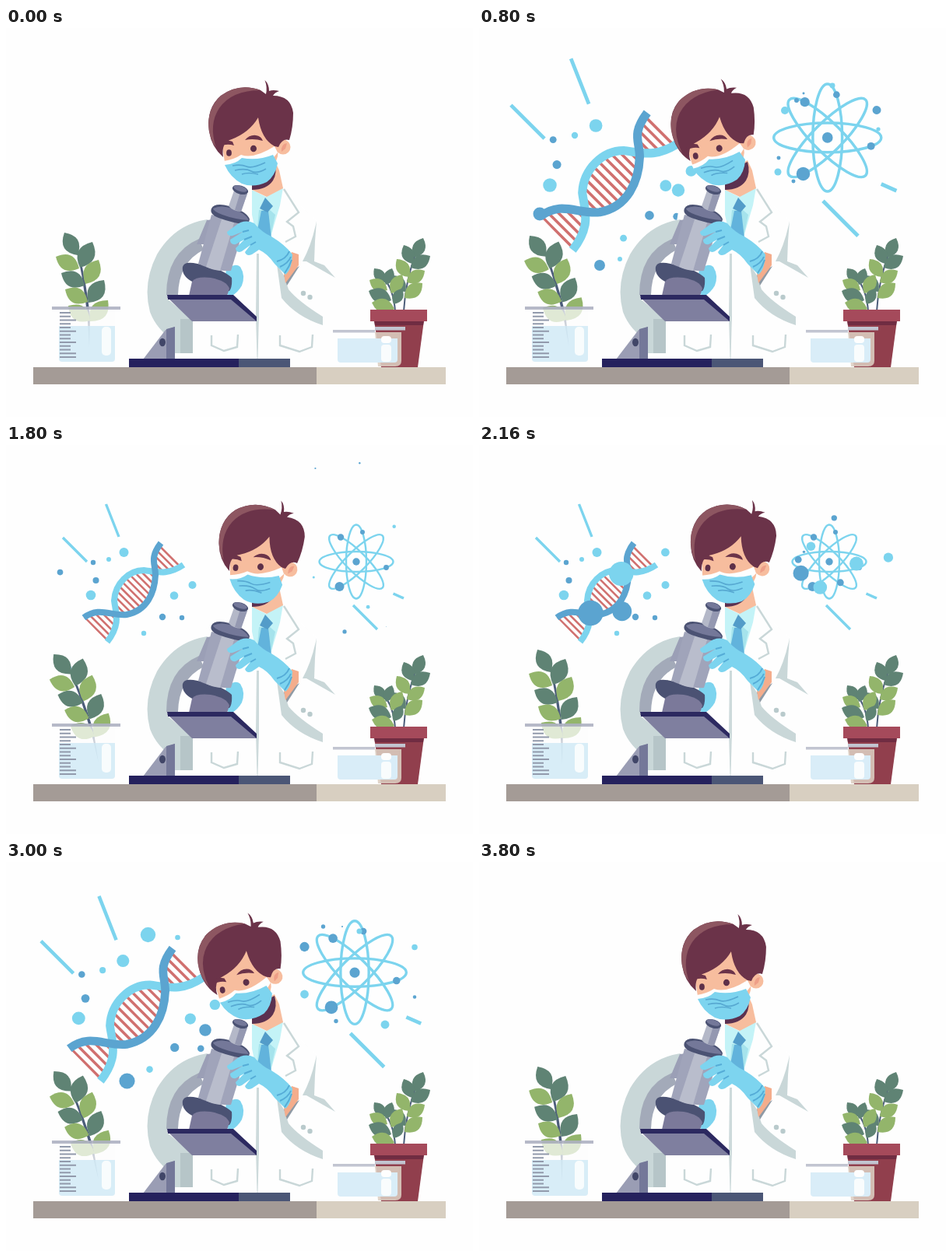
An HTML page for the animation above (3840 ms loop, 600 by 500 pixels).

```html
<!DOCTYPE html>
<html lang="en">
<head>
<meta charset="utf-8">
<title>Scientist at the microscope</title>
<style>
  html, body { margin: 0; width: 100%; height: 100%; overflow: hidden; background: #fefefe; }
  svg { display: block; width: 600px; height: 500px; }
  .line { fill: none; stroke: #c9d7d8; stroke-width: 2.4; }
  .ray { stroke: #7cd4ee; stroke-width: 3.4; }
</style>
</head>
<body>
<svg viewBox="0 0 600 500">
  <defs><clipPath id="between"><path id="strandArea"/></clipPath></defs>

  <g id="dna">
    <path class="ray" d="M73 119L104 150M128.5 76L145 118"/>
    <g id="rungs" clip-path="url(#between)" stroke="#d0706f" stroke-width="2.6"></g>
    <path id="lightStrand" fill="none" stroke="#7cd4ee" stroke-width="8"/>
    <path id="darkStrand" fill="none" stroke="#5ba4d0" stroke-width="8"/>
  </g>
  <g id="atom">
    <path class="ray" d="M446 206L477 237M497.500 191L511 197"/>
    <g id="orbits" fill="none" stroke="#7cd4ee" stroke-width="2.4"></g>
  </g>
  <g id="sparks"></g>

  <!-- coat -->
  <path fill="#fefefe" d="M316 208L256 236L250 275L240 345V425H395L407 382L423 321L399 248L353 205Z"/>
  <path fill="#c4f3f7" d="M316 208L334 217L356 205L352 228L340 268H322L316 240Z"/>
  <path fill="#a5e3ec" d="M325 234L322 268H340L346 240L338 233Z"/>
  <path fill="#62b3dc" d="M328 235L337 235L341 270H321Z"/>
  <path fill="#539cc9" d="M333 218L343 229L336 237L326 232Z"/>
  <path class="line" d="M357 207L376 237L361 249L369 255L372 268L359 275"/>
  <path fill="#cddadb" d="M322 290H325L325 370L323.500 425H322.500L321 370Z"/>
  <path fill="#c9d7d8" d="M399 248L397 274L396 300L409 305L423 321L386 300L381 300Q393 278 399 248Z"/>
  <path class="line" stroke-width="2" d="M264 395V408L280 415L297 410L298 394M352 395V408L377 416L393 410L394 394"/>

  <!-- neck -->
  <path fill="#f7bd9e" d="M316 185L345 170L351 183L356 206L335 217L316 208Z"/>
  <path fill="#5b3150" d="M316 186L345 172Q349 186 343 196Q335 208 316 208Z"/>

  <g id="head">
    <path fill="#f7bd9e" d="M276 140L318 112L352 125L349 165L340 192L300 196L281 172Z"/>
    <circle cx="356" cy="153" r="9.500" fill="#f7bd9e"/>
    <path d="M361 148Q353 149 354 159L359 155Z" fill="#ee9f88"/>
    <path fill="#6b3349" d="M279 166Q264 153 261 133Q257 103 276 87Q300 70 327 80L334 85Q336 76 332.500 67Q338 72 338 81Q343 79 351 81Q345 83 343 87Q366 87 369 109Q369 128 364 144Q355 141 350 153L345 152Q328 143 324 115Q313 134 290 143Q276 147 279 166Z"/>
    <path fill="#8d5661" d="M270 154Q260 140 260 122Q261 101 276 87Q299 70 327 80Q290 80 274 103Q260 124 270 154Z"/>
    <path fill="#6b3349" d="M274 152Q277 144 284 144L291 146L293 151Q284 148 274 152ZM307 144Q313 137 321 138Q328 139 330 145Q318 141.500 307 144Z"/>
    <ellipse cx="286.500" cy="160.500" rx="3.400" ry="4.300" fill="#5d3049"/>
    <ellipse cx="318" cy="155" rx="4" ry="4.300" fill="#5d3049"/>
    <path fill="#fefefe" d="M280 171Q293 169 302 163Q318 169 345 152L349 160L341 170L282 178Z"/>
    <path fill="#7dd4ef" d="M281 176Q295 175 303 167Q323 171 343 163L349 174Q346 190 335 198Q318 206 303 200Q288 192 281 176Z"/>
    <path fill="none" stroke="#57a9d2" stroke-width="1.700" d="M291 177Q302 175 309 178T333 173M294 183Q308 180 315 184T334 181M303 188Q311 185 324 188"/>
  </g>

  <!-- hand behind the tube -->
  <path fill="#7dd4ef" d="M283 311Q294 301 301 307Q308 318 303 331Q298 340 289 345L278 338Z"/>

  <!-- microscope -->
  <path fill="#c9d7d8" d="M259 246Q217 252 194 291Q175 328 185 365Q194 389 217 402V418H240V375L207 348Q206 303 251 277Z"/>
  <path fill="#a3aab9" d="M248 271Q206 289 206 343H221Q222 301 254 285Z"/>
  <path fill="#b6c5c8" d="M224 374H240V418H224Z"/>
  <path fill="#9a9db4" d="M176 426L205 388L217 384V426Z"/>
  <path fill="#747899" d="M206 387L217 384V426H206Z"/>
  <ellipse cx="201" cy="404" rx="4" ry="5.200" fill="#414668"/>
  <path fill="#9b9fb6" d="M258 247L274 245L266 278L245 278Z"/>
  <path fill="#4b5273" d="M227 307Q229 299 246 303Q278 309 290 321Q291 333 287 338Q267 338 243 328Q225 320 227 307Z"/>
  <path fill="#7b799a" d="M235 344L239 326Q244 319 263 321Q284 325 287 335L284 344Z"/>
  <path fill="#a0a4ba" d="M264 240L308 250L289 312Q270 314 247 303Z"/>
  <path fill="#b9bdcc" d="M278 243L294 247L275 312Q265 311 257 307Z"/>
  <path fill="#4b5273" d="M264 232Q268 224 287 229Q310 236 313 246L311 253Q292 251 273 244Q261 239 264 232Z"/>
  <path fill="#747899" d="M266 232Q276 227 291 232Q309 239 312 247Q294 246 278 240Q267 236 266 232Z"/>
  <path fill="#b4b8c8" d="M293 209L310 213L302 236Q291 235 286 229Z"/>
  <path fill="#9498b1" d="M301 211L310 213L302 236L294 234Z"/>
  <ellipse cx="301" cy="208" rx="10.500" ry="5.500" transform="rotate(17 301 208)" fill="#4b5273"/>
  <ellipse cx="301" cy="206.500" rx="9" ry="3.500" transform="rotate(17 301 206.500)" fill="#747899"/>
  <path fill="#7f7f9f" d="M207 346H290L322 374V377L239 377Z"/>
  <path fill="#2c2960" d="M207 343H292L322 371V377L289 349H208Z"/>
  <path fill="#25215d" d="M158 425H299V436H158Z"/>
  <path fill="#4b5676" d="M299 425H365V436H299Z"/>

  <!-- front arm -->
  <path fill="#c9d7d8" d="M348 304L357 318L363 336Q375 351 407 371V382Q373 371 354 347Z"/>
  <circle cx="382" cy="341" r="3.200" fill="#b9cacc"/><circle cx="390.500" cy="346" r="3.200" fill="#b9cacc"/>
  <path fill="#8f9aa5" d="M357 318L377 306L361 331Z"/>
  <path fill="#f4ad8c" d="M367 288L376 291L376 305L359 328L357 315Z"/>
  <path fill="#7dd4ef" d="M368 291Q359 279 341 268Q329 263 319 251Q306 245 295 254L284 262Q284 268 291 267L304 262L288 272Q288 279 295 278L306 272L295 283Q296 290 303 287L314 279L307 288Q309 294 316 291L325 285Q336 290 345 303L359 317Q367 311 368 291Z"/>
  <path fill="none" stroke="#55acd7" stroke-width="2" d="M348 300Q360 297 364 287M352 307Q363 302 366 294M358 315Q364 307 367 298M304 262L312 260M306 272L316 268M314 279L321 275"/>

  <!-- table -->
  <path fill="#a49b96" d="M35 436H399V458H35Z"/><path fill="#d8cfc1" d="M399 436H565V458H399Z"/>

  <!-- beaker with cutting -->
  <g id="plant"><path d="M93 285Q103 325 108 370L107 411Q105 350 91 286Z" fill="#4c5d7a"/></g>
  <path fill="#fefefe" opacity=".72" d="M68 361H140V430H68Z"/>
  <path fill="#cfe9f7" opacity=".78" d="M68 383H140V425Q140 429 136 429H72Q68 429 68 425Z"/>
  <rect x="123" y="384" width="12" height="37" rx="5" fill="#fefefe" opacity=".85"/>
  <path id="ticks" stroke="#929aac" stroke-width="2"/>
  <path fill="#aeb2c3" opacity=".9" d="M59 358H147V362H59Z"/>

  <!-- pot -->
  <g id="potPlant"><path d="M511 364Q513 325 528 285M500 364Q498 335 484 320" fill="none" stroke="#4c5d7a" stroke-width="2"/></g>
  <path fill="#913f4d" d="M473 376H537L529 436H482Z"/>
  <path fill="#702c42" d="M473 376H537L536 382H474Z"/>
  <path fill="#a54a5b" d="M468 362H541V377H468Z"/>

  <!-- dish -->
  <path fill="#dccfc2" opacity=".88" d="M474 391H508V428Q508 435 500 435H478Z"/>
  <path fill="#d9edf8" d="M426 399H503V426Q503 430 499 430H430Q426 430 426 426Z"/>
  <rect x="482" y="396" width="13" height="9" rx="4" fill="#fefefe"/>
  <rect x="482" y="407" width="13" height="22" rx="4" fill="#fefefe" opacity=".85"/>
  <path fill="#fefefe" d="M420 383H468V388H420Z"/>
  <path fill="#c2c5d1" d="M420 388H474V391.500H420ZM474 384H513V388.500H474Z"/>
</svg>
<script>
const LOOP = 3840, BLUE = '#5ba4d0', SKY = '#7cd4ee', DARK = '#5f8374', LIME = '#93b56b';
const $ = id => document.getElementById(id);

function add(parent, tag, attrs) {
  const el = document.createElementNS('http://www.w3.org/2000/svg', tag);
  for (const k in attrs) el.setAttribute(k, attrs[k]);
  return parent.appendChild(el);
}

// Leaf from tip to base with a pointed oval outline
function leaf(parent, color, x1, y1, x2, y2) {
  const mx = x1 + (x2 - x1) * .5, my = y1 + (y2 - y1) * .5;
  const nx = (y1 - y2) * .6, ny = (x2 - x1) * .6;
  add(parent, 'path', { fill: color,
    d: `M${x1} ${y1}Q${mx + nx} ${my + ny} ${x2} ${y2}Q${mx - nx} ${my - ny} ${x1} ${y1}Z` });
}
function leaves(parent, rows) { for (const r of rows) leaf(parent, ...r); }

leaves($('plant'), [
  [DARK, 75, 263, 92, 292], [DARK, 111, 275, 95, 308], [LIME, 64, 294, 94, 309],
  [DARK, 71, 315, 101, 331], [LIME, 119, 298, 102, 329], [DARK, 126, 324, 106, 353],
  [LIME, 76, 336, 105, 352], [LIME, 131, 350, 108, 377], [LIME, 80, 357, 108, 376]
]);
leaves($('potPlant'), [
  [DARK, 536, 270, 525, 295], [DARK, 511, 279, 522, 303], [DARK, 545, 293, 520, 308],
  [LIME, 502, 297, 518, 320], [LIME, 538, 312, 515, 327],
  [DARK, 497, 318, 513, 339], [LIME, 535, 328, 512, 347], [DARK, 473, 309, 487, 327],
  [DARK, 496, 309, 488, 330], [LIME, 467, 324, 490, 337], [LIME, 509, 317, 495, 341],
  [DARK, 466, 338, 495, 350], [DARK, 509, 335, 498, 355], [LIME, 470, 353, 499, 361]
]);

let ticks = '';
for (let i = 0; i < 13; i++) ticks += `M69 ${366 + i * 4.75}h${i % 3 === 2 || i === 12 ? 21 : 14}`;
$('ticks').setAttribute('d', ticks);

// Double helix
const dark = '100 222C120 207 134 220 155 218C181 213 191 190 192 167C192 152 184 146 199 126';
const light = '130 253C148 230 141 216 139 200C140 178 158 161 177 161C194 163 207 168 228 154';
const lightBack = '228 154C207 168 194 163 177 161C158 161 140 178 139 200C141 216 148 230 130 253';
$('darkStrand').setAttribute('d', 'M' + dark);
$('lightStrand').setAttribute('d', 'M' + light);
$('strandArea').setAttribute('d', `M${dark}L${lightBack}Z`);
for (let i = 0; i < 23; i++) {
  const x = 112 + i * 4.7, y = 242 - i * 4.7;
  add($('rungs'), 'path', { d: `M${x - 26} ${y - 26}l52 52` });
}

for (const a of [0, 45, 90, 135])
  add($('orbits'), 'ellipse', { cx: 450, cy: 150, rx: 47.5, ry: 13, transform: `rotate(${a} 450 150)` });

function dots(parent, list) {
  for (const [x, y, r, c] of list) add(parent, 'circle', { cx: x, cy: y, r, fill: c });
}
dots($('dna'), [
  [112, 151, 3.2, BLUE], [132, 147, 3, SKY], [151.5, 138, 6, SKY], [115.5, 174, 4, BLUE], [109, 193, 6.3, SKY],
  [216, 193.5, 5.3, SKY], [239.5, 180, 5, SKY], [201, 221, 4.2, BLUE], [226, 222, 3.2, BLUE], [177, 242, 3.2, SKY]
]);
dots($('atom'), [
  [450, 150, 4.7, BLUE], [430, 118.5, 4.2, BLUE], [458, 112, 3, BLUE], [488.5, 157.5, 3.4, BLUE], [428.5, 182, 6, BLUE]
]);

// Bursts: dots spiral out from a centre, then shrink.
// Dot: x, y, radius at the key time, colour, head start in ms, own swirl
const HELIX = [160, 190], CORE = [450, 150];
const bursts = [
  { at: HELIX, start: 200, key: 800, end: 1100, swirl: -45, dots: [
    [78, 239, 8.5, BLUE], [155, 305, 7, BLUE], [256, 208.5, 8.2, SKY], [181, 297, 3, SKY]] },
  { at: CORE, start: 200, key: 800, end: 1100, swirl: 108, dots: [
    [393, 106, 5, SKY], [408, 93, 3, BLUE], [384, 185, 4.5, SKY], [385, 167, 2.5, BLUE],
    [404, 197, 2.5, BLUE], [454, 74, 3.5, SKY], [511, 105.5, 5.5, BLUE], [513, 130, 2.6, SKY], [417, 84, 1.5, BLUE]] },
  { at: HELIX, start: 1000, key: 1400, end: 1960, swirl: -45, dots: [
    [90.5, 158, 12, BLUE], [85, 258, 9, BLUE], [213, 263, 11, SKY], [233, 248, 4, SKY]] },
  { at: CORE, start: 1120, key: 1400, end: 1980, swirl: 108, dots: [
    [400, 111, 3.3, BLUE], [386, 136, 3, BLUE], [446, 117, 6.2, SKY], [478, 161, 6.5, SKY],
    [482, 182.5, 7.2, BLUE], [442, 178, 4.2, SKY], [495, 159, 1.2, BLUE]] },
  { at: HELIX, start: 1940, key: 2560, end: 3720, swirl: -45, dots: [
    [155.5, 281.5, 13.3, BLUE], [256, 216, 10.2, BLUE], [182.5, 93.5, 12.8, SKY], [220.5, 97, 4.4, SKY, 200, -164]] },
  { at: CORE, start: 1880, key: 2560, end: 3720, swirl: 108, dots: [
    [383.5, 109, 8.2, BLUE], [407.5, 83, 3.6, BLUE], [432, 83, 1.4, BLUE], [454, 89, 4.7, SKY],
    [525, 109.5, 5, SKY, 160, -227], [383.5, 170, 7.2, SKY], [424, 204.5, 3.6, BLUE],
    [487, 209, 7.3, SKY], [525, 173.5, 3, BLUE, 80, 360]] }
];
for (const b of bursts)
  b.els = b.dots.map(d => add($('sparks'), 'circle', { fill: d[3], r: 0 }));

const clamp = v => Math.min(1, Math.max(0, v));
const ease = v => (1 - Math.cos(Math.PI * clamp(v))) / 2;

function track(keys, t) {
  for (let i = 1; i < keys.length; i++) {
    const [t0, v0] = keys[i - 1], [t1, v1] = keys[i];
    if (t <= t1) return v0 + (v1 - v0) * ease((t - t0) / (t1 - t0));
  }
  return keys[keys.length - 1][1];
}

const nod = [[0, 0], [880, -8.2], [1850, 8], [2000, 8], [2960, -8.2], [3840, 0]];
const pop = [[0, 0], [760, 1.4], [1180, 1], [2820, 1], [3160, 1.62], [3800, 0]];
const sway = [0, 1, -1, 1, -1, 1, -1, 1, 0].map((v, i) => [i * 480, v * 14.4]);

function size(b, t) {
  const age = t - b.start;
  return clamp(age / 150) * (1 - age * .00041) * clamp((b.end - t) / 400);
}

function drawBurst(b, t) {
  const live = t > b.start && t < b.end, [cx, cy] = b.at;
  b.dots.forEach(([x, y, r, , lead = 0, swirl = b.swirl], i) => {
    const el = b.els[i];
    if (!live) return el.setAttribute('r', 0);
    const out = time => ease((time - b.start + lead) / 560);
    const p = out(t), q = out(b.key);
    const a = Math.atan2(y - cy, x - cx) + (p - q) * swirl * Math.PI / 180;
    const d = Math.hypot(x - cx, y - cy) * p / q;
    el.setAttribute('cx', cx + d * Math.cos(a));
    el.setAttribute('cy', cy + d * Math.sin(a));
    el.setAttribute('r', r * size(b, t) / size(b, b.key));
  });
}

const move = (id, value) => $(id).setAttribute('transform', value);
const zoom = (x, y, s) => `translate(${x} ${y}) scale(${Math.max(0, s)}) translate(${-x} ${-y})`;

function draw(t) {
  const s = track(pop, t);
  move('dna', zoom(155, 170, s));
  move('atom', zoom(455, 170, s + (s - 1) * .16));
  move('head', `rotate(${track(nod, t)} 311 221)`);
  move('plant', `rotate(${track(sway, t)} 102 343)`);
  for (const b of bursts) drawBurst(b, t);
}

const begin = performance.now();
function tick() {
  draw((performance.now() - begin) % LOOP);
  requestAnimationFrame(tick);
}
draw(0);
requestAnimationFrame(tick);
</script>
</body>
</html>
```
